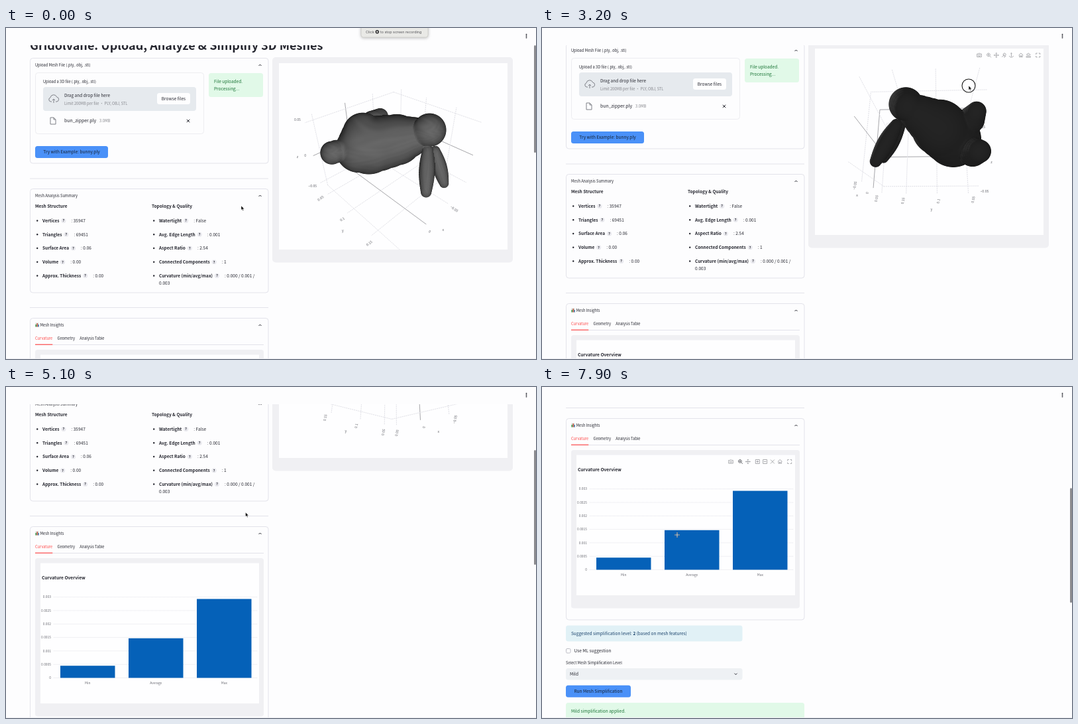
Recreate the animation shown at these times as an HTML page with a canvas. Size 800x499 px, loop 8 s.

```html
<!DOCTYPE html>
<html lang="en">
<head>
<meta charset="utf-8">
<title>Mesh viewer demo</title>
<style>
  html, body { margin: 0; width: 100%; height: 100%; overflow: hidden; background: #fdfdfe; }
  #stage { position: absolute; left: 0; top: 0; width: 800px; height: 499px; overflow: hidden; }
  #view { position: absolute; left: 0; top: 26px; width: 800px; height: 473px; overflow: hidden; }
  #page { position: absolute; left: 0; top: -26px; width: 800px; height: 920px; }
  svg, canvas { position: absolute; left: 0; top: 0; }
  #mesh { left: 412px; top: 53px; }
  text { font-family: "Noto Sans CJK SC", "Noto Sans CJK JP", "Noto Sans CJK", Lato, "Open Sans", sans-serif; white-space: pre; }
  .ui { font-family: Inter, Roboto, sans-serif; }
</style>
</head>
<body>
<div id="stage">
  <div id="view"><div id="page">
    <svg id="doc" width="800" height="920"></svg>
    <canvas id="mesh" width="345" height="281"></canvas>
  </div></div>
  <svg id="over" width="800" height="499"></svg>
</div>
<script>
const $ = id => document.getElementById(id);
const LOOP = 8000, STEP = 100;
const BASE = 6.5, SMALL = 5.7;
const INK = '#25262f', MUTED = '#85868c', RED = '#ff4b4b', BLUE = '#4a91f8';
const PAPER = '#fefeff', BORDER = '#e3e3ea', SAND = '#f0f0f3', FIELD = '#e6eaee', GREEN = '#e1f9e8', LEAF = '#177233';
const doc = $('doc'), over = $('over');

// ---------- drawing helpers ----------
function el(parent, tag, attrs, content) {
  const node = document.createElementNS('http://www.w3.org/2000/svg', tag);
  set(node, attrs);
  if (content != null) node.textContent = content;
  return parent.appendChild(node);
}
function set(node, attrs) {
  for (const k in attrs) node.setAttribute(k, attrs[k]);
}
const group = (p, attrs) => el(p, 'g', attrs);
const rect = (p, x, y, width, height, fill, rx = 0, stroke = 'none') =>
  el(p, 'rect', { x, y, width, height, fill, rx, stroke });
const line = (p, x1, y1, x2, y2, stroke, dash = 'none') =>
  el(p, 'line', { x1, y1, x2, y2, stroke, 'stroke-dasharray': dash });
const path = (p, x, y, d, stroke = INK, width = 1, fill = 'none') =>
  el(p, 'path', { d, stroke, fill, 'stroke-width': width, transform: `translate(${x} ${y})` });
// y is the middle of the letters
const label = (p, x, y, str, size = BASE, fill = INK, weight = 400, anchor = 'start') =>
  el(p, 'text', { x, y: y + size * .36, 'font-size': size, fill, 'font-weight': weight, 'text-anchor': anchor }, str);
const chevron = (p, x, y, dir) => path(p, x, y, `M-2 ${dir}L0 ${-dir} 2 ${dir}`);
const show = (node, on) => node.setAttribute('visibility', on ? 'visible' : 'hidden');

const ICONS = {
  camera: 'M-3.3-2h1.8l1-1h1l1 1h1.8v4.6h-6.6zM0-1.2a1.4 1.4 0 1 0 .01 0',
  zoom: 'M-.6-3a2.4 2.4 0 1 0 .01 0M1.2 1.2L3.3 3.3M-1.8-.6h2.4M-.6-1.8v2.4',
  pan: 'M-3.5 0h7M0-3.5v7M-1-2.5l1-1 1 1M-1 2.5l1 1 1-1M-2.5-1l-1 1 1 1M2.5-1l1 1-1 1',
  orbit: 'M-2.8 2.8L1-1M1-3a2 2 0 1 0 .01 0M0 3a3 3 0 0 0 3-2',
  turn: 'M0-3.5v6M-3 1c0 2.8 6 2.8 6 0M-1-2.5l1-1 1 1',
  home: 'M-3.3 0L0-3 3.3 0M-2.2 0v2.8h1.6v-2h1.2v2h1.6v-2.8',
  reset: 'M-3.3-.5L0-3 3.3-.5M-2.4 0h4.8M-3.3 2h6.6v1h-6.6z',
  full: 'M-3-1v-2h2M1-3h2v2M3 1v2h-2M-1 3h-2v-2',
  plus: 'M-3-3h6v6h-6zM-1.8 0h3.6M0-1.8v3.6',
  minus: 'M-3-3h6v6h-6zM-1.8 0h3.6',
  fit: 'M-3-3L3 3M3-3L-3 3'
};
// '|' widens the gap between two icons
function toolbar(p, x, y, names, active) {
  const g = group(p);
  for (const n of names.split(' ')) {
    if (n === '|') { x += 3.2; continue; }
    path(g, x, y, ICONS[n], n === active ? '#55565c' : '#a2a3a8', .9);
    x += 11.3;
  }
  return g;
}

// ---------- page ----------
label(doc, 36, 26.5, 'Gridolvane: Upload, Analyze & Simplify 3D Meshes', 18, INK, 700);

function expander(y, h, title, x = 44) {
  rect(doc, 36.5, y + .5, 359.5, h, 'none', 4, BORDER);
  label(doc, x, y + 11, title, SMALL);
  chevron(doc, 383.5, y + 11, 1);
}
expander(45, 158.5, 'Upload Mesh File (.ply, .obj, .stl)');
rect(doc, 44.5, 67.5, 254, 92, 'none', 4, '#ededf1');
label(doc, 56, 80.5, 'Upload a 3D file (.ply, .obj, .stl)', SMALL);
rect(doc, 56, 89, 231, 36, FIELD, 4);
path(doc, 72, 107, 'M-3 4h-1.5a3.2 3.2 0 0 1-.5-6.2a5 5 0 0 1 9.6-.8a3.6 3.6 0 0 1 .4 7h-2M0 6v-6M-2 2l2-2 2 2', '#7e8087');
label(doc, 88, 101.5, 'Drag and drop file here');
label(doc, 88, 114, 'Limit 200MB per file • PLY, OBJ, STL', SMALL, MUTED);
rect(doc, 228, 98, 50, 17, PAPER, 3.5);
label(doc, 253, 106.5, 'Browse files', BASE, INK, 400, 'middle');
path(doc, 71, 140, 'M-4-5h5l3 3v7h-8zM1-5v3h3', '#7e8087');
label(doc, 88, 139.5, 'bun_zipper.ply', 6.9);
label(doc, 141, 139.7, '3.0MB', SMALL, MUTED);
path(doc, 275, 140, 'M-2.2-2.2L2.2 2.2M2.2-2.2L-2.2 2.2');
rect(doc, 306, 68, 82, 36, GREEN, 3.5);
label(doc, 314, 80.5, 'File uploaded.', BASE, LEAF);
label(doc, 314, 92, 'Processing...', BASE, LEAF);

function button(x, y, w, str) {
  rect(doc, x, y, w, 18, BLUE, 3.5);
  label(doc, x + w / 2, y + 9, str, BASE, '#16202f', 500, 'middle');
}
button(44, 178, 110, 'Try with Example: bunny.ply');
for (const y of [227, 421.5]) line(doc, 36, y, 396, y, BORDER);

expander(242, 156.5, 'Mesh Analysis Summary');
label(doc, 44, 269, 'Mesh Structure', BASE, INK, 700);
label(doc, 220, 269, 'Topology & Quality', BASE, INK, 700);
function facts(x, rows) {
  Object.entries(rows).forEach(([name, value], i) => {
    const y = 290.5 + 20.75 * i;
    el(doc, 'circle', { cx: x - 7.8, cy: y, r: 1.2, fill: INK });
    const end = x + label(doc, x, y, name, BASE, INK, 700).getComputedTextLength();
    el(doc, 'circle', { cx: end + 6.4, cy: y, r: 3.6, fill: '#e9e9ee' });
    label(doc, end + 6.4, y, '?', 5.2, INK, 700, 'middle');
    label(doc, end + 18, y, ': ' + value);
  });
}
facts(55, { 'Vertices': '35947', 'Triangles': '69451', 'Surface Area': '0.06', 'Volume': '0.00', 'Approx. Thickness': '0.00' });
facts(231, { 'Watertight': 'False', 'Avg. Edge Length': '0.001', 'Aspect Ratio': '2.54', 'Connected Components': '1',
  'Curvature (min/avg/max)': '0.000 / 0.001 /' });
label(doc, 231, 385, '0.003');

expander(437, 303.5, 'Mesh Insights', 51.5);
rect(doc, 44, 444.5, 6, 6, '#dfe6e2');
['#3a9a4a', '#c0503c', '#3a6fa8'].forEach((c, i) => rect(doc, 44.5 + i * 1.9, 447 - i % 2 * 2, 1.5, 3.5 + i % 2 * 2, c));
line(doc, 44, 477.5, 389, 477.5, BORDER);
let tabX = 44;
const tabs = ['Curvature', 'Geometry', 'Analysis Table'].map(s => {
  const x = tabX, node = label(doc, x, 468, s, SMALL), w = node.getComputedTextLength();
  tabX += w + 7.3;
  return { x, node, w };
});
const underline = rect(doc, 44, 476.6, 27, 1.2, RED);
rect(doc, 44, 485, 345, 238.5, SAND, 4);
rect(doc, 52, 492.5, 330, 211.5, PAPER);

function chart(title, tick, names, values) {
  const g = group(doc), zero = 665.5, gap = 20.3;
  label(g, 54, 514.5, title, 6.7, INK, 700);
  for (let i = 0; i <= 6; i++) {
    const y = zero - gap * i;
    line(g, 72, y, 380, y, '#e2e2e8', '1 1');
    label(g, 68, y, String(+(tick * i).toFixed(4)), 4.9, '#6c6d74', 400, 'end');
  }
  names.forEach((name, i) => {
    const x = 82 + 103 * i, h = values[i] / tick * gap;
    rect(g, x, zero - h, 82.5, h, '#0561b8');
    label(g, x + 41.25, zero + 8, name, 4.9, '#6c6d74', 400, 'middle');
  });
  return g;
}
const charts = [
  chart('Curvature Overview', .0005, ['Min', 'Average', 'Max'], [.00045, .00147, .00293]),
  chart('Geometry Overview', .01, ['Surface Area', 'Volume', 'Thickness'], [.06, 0, 0])
];
const chartTools = toolbar(doc, 285, 502.5, 'camera | zoom pan | plus minus fit home | full', 'zoom');

rect(doc, 36, 749.5, 266.5, 24, '#e1f1f6', 3.5);
const advice = label(doc, 44, 761.5, 'Suggested simplification level: ', BASE, '#17406a');
el(advice, 'tspan', { 'font-weight': 700 }, '2');
el(advice, 'tspan', {}, ' (based on mesh features)');
rect(doc, 36.5, 784.5, 6.5, 6.5, PAPER, 1.5, '#bcbcc4');
label(doc, 48.5, 787.7, 'Use ML suggestion');
label(doc, 36, 805.7, 'Select Mesh Simplification Level', SMALL);
rect(doc, 36, 814, 266.5, 17.5, '#eef1f4', 3.5);
label(doc, 42, 822.7, 'Mild');
chevron(doc, 292.5, 822.7, -1);
button(36, 839.7, 98, 'Run Mesh Simplification');
rect(doc, 36, 866, 360, 25, GREEN, 3.5);
label(doc, 44, 878.5, 'Mild simplification applied.', BASE, LEAF);

// ---------- 3D plot ----------
const W = 345, H = 281, LEFT = 412, TOP = 53;
rect(doc, 402, 44, 363, 309.5, SAND, 5);
rect(doc, LEFT, TOP, W, H, PAPER);
rect(el(el(doc, 'defs'), 'clipPath', { id: 'plot' }), LEFT, TOP, W, H);
const plot = group(doc, { 'clip-path': 'url(#plot)' });
const plotTools = toolbar(doc, 660, 63, 'camera | zoom pan orbit turn | home reset | full');

// Data units of 0.1 are scaled so that the box has a volume of one
const UNIT = .7, FOCAL = H / 2 / Math.tan(Math.PI / 8), DIST = Math.sqrt(3) * 1.25;
const AXES = [
  { name: 'x', mid: -.17, half: .546, ticks: [.5, 0, -.5] },
  { name: 'y', mid: 1.1, half: .54, ticks: [.5, 1, 1.5] },
  { name: 'z', mid: -.015, half: .42, ticks: [.5, 0, -.5] }
];
for (const a of AXES) {
  a.at = a.ticks.map(v => (v - a.mid) * UNIT);
  a.labels = [...a.ticks.map(v => String(v / 10).replace('-', '−')), a.name];
}
const gridLines = Array.from({ length: 18 }, () => line(plot, 0, 0, 0, 0, '#e0e0e6'));
for (const a of AXES) a.nodes = a.labels.map(s => label(plot, 0, 0, s, 5.2, '#66676d', 400, 'middle'));

const dot = (a, b) => a[0] * b[0] + a[1] * b[1] + a[2] * b[2];
const mix = (a, b, k) => a.map((v, i) => v + (b[i] - v) * k);

function camera(azimuth, elevation) {
  const a = azimuth * Math.PI / 180, e = elevation * Math.PI / 180;
  const ca = Math.cos(a), sa = Math.sin(a), ce = Math.cos(e), se = Math.sin(e);
  const eye = [ca * ce, sa * ce, se], right = [-sa, ca, 0], up = [-se * ca, -se * sa, ce];
  const project = p => {
    const near = dot(p, eye), scale = FOCAL / (DIST - near);
    return { x: W / 2 + dot(p, right) * scale, y: H / 2 - dot(p, up) * scale, near, scale };
  };
  return { eye, right, up, project };
}

function drawAxes({ eye, project }) {
  const side = eye.map(v => v < 0 ? -1 : 1);
  const screen = p => { const q = project(p); return [LEFT + q.x, TOP + q.y]; };
  let n = 0;
  // grid on the three far walls
  for (let wall = 0; wall < 3; wall++) {
    for (const [along, across] of [[(wall + 1) % 3, (wall + 2) % 3], [(wall + 2) % 3, (wall + 1) % 3]]) {
      AXES[across].at.forEach((v, i) => {
        const p = [0, 0, 0];
        p[wall] = -side[wall] * AXES[wall].half;
        p[across] = v;
        p[along] = -AXES[along].half;
        const [x1, y1] = screen(p);
        p[along] *= -1;
        const [x2, y2] = screen(p);
        const zero = AXES[across].ticks[i] === 0;
        set(gridLines[n++], { x1, y1, x2, y2, stroke: zero ? '#a6a6aa' : '#e0e0e6', 'stroke-dasharray': zero ? 'none' : '2 1' });
      });
    }
  }
  // tick labels sit just outside the outline of the box
  AXES.forEach((axis, i) => {
    const edge = i === 2 ? [1, -side[0] * side[1], 0] : [side[0] * side[2], side[1] * side[2], -1];
    const base = edge.map((s, j) => s * AXES[j].half), next = [...base];
    const other = i === 2 ? 0 : 1 - i;
    base[i] = next[i] = 0;
    next[other] *= .8;
    const a = screen(base), b = screen(next);
    const slope = Math.atan((a[1] - b[1]) / (a[0] - b[0])) * 180 / Math.PI;
    const turn = i === 2 ? 0 : eye[2] < 0 ? -78 : slope;
    axis.nodes.forEach((node, j) => {
      const p = [...base], title = j === 3;
      p[i] = title ? 0 : axis.at[j];
      const [x, y] = screen(p), dx = x - LEFT - W / 2, dy = y - TOP - H / 2;
      const k = 1 + (title ? 24 : 12) / Math.hypot(dx, dy);
      set(node, { transform: `translate(${LEFT + W / 2 + dx * k} ${TOP + H / 2 + dy * k}) rotate(${title ? 0 : turn})` });
    });
  });
}

// The rabbit is a union of limbs, each a chain of spheres
const limb = (from, to, r0, r1, bulge = 0) => {
  const n = Math.ceil(Math.hypot(...from.map((v, i) => to[i] - v)) / (.4 * Math.min(r0, r1)));
  return Array.from({ length: n + 1 }, (_, i) => {
    const k = i / n;
    return { p: mix(from, to, k), r: r0 + (r1 - r0) * k + bulge * Math.sin(Math.PI * k) };
  });
};
const HIP = [.1, -.24, .06], CHEST = [-.15, -.1, .08];
const spheres = [
  limb(HIP, CHEST, .285, .26),
  limb(CHEST, [-.27, .08, .16], .25, .17),
  limb([-.27, .2, .26], [-.37, .17, .18], .155, .12),
  limb([.2, -.27, .05], [.1, -.32, .17], .23, .2),
  limb([.4, -.35, .08], [.44, -.36, .08], .11, .11),
  limb([-.1, -.4, .18], [-.23, -.43, .2], .13, .09),
  limb([-.05, -.4, -.12], [-.22, -.43, -.17], .14, .1),
  limb([-.2, .25, .1], [.03, .44, -.15], .05, .05, .025),
  limb([-.3, .27, .05], [-.3, .42, -.27], .05, .05, .025)
].flat();

const LIGHT = [.55, .68, .49];
const ctx = $('mesh').getContext('2d');
const image = ctx.createImageData(W, H);
const field = new Float32Array(W * H * 4);

function drawMesh({ eye, right, up, project }) {
  field.fill(0);
  for (const { p, r } of spheres) {
    const c = project(p), R = r * c.scale;
    for (let y = Math.max(0, Math.floor(c.y - R)); y < Math.min(H, c.y + R); y++) {
      for (let x = Math.max(0, Math.floor(c.x - R)); x < Math.min(W, c.x + R); x++) {
        const u = (x + .5 - c.x) / R, v = (y + .5 - c.y) / R, q = 1 - u * u - v * v;
        if (q <= 0) continue;
        const z = Math.sqrt(q), w = Math.exp((c.near + r * z) * 40), o = (y * W + x) * 4;
        field[o] += w * u;
        field[o + 1] += w * v;
        field[o + 2] += w * z;
        field[o + 3] = Math.max(field[o + 3], Math.min(1, q * R / 1.6));
      }
    }
  }
  const lx = dot(LIGHT, right), ly = -dot(LIGHT, up), lz = dot(LIGHT, eye);
  for (let o = 0; o < field.length; o += 4) {
    const [nx, ny, nz, alpha] = field.subarray(o, o + 4);
    image.data[o + 3] = alpha * 255;
    if (!alpha) continue;
    const len = Math.hypot(nx, ny, nz);
    // ripples follow the surface direction, so they turn with the body
    const a = (nx * right[0] - ny * up[0] + nz * eye[0]) / len, b = (-ny * up[2] + nz * eye[2]) / len;
    const ripple = .04 * Math.sin(16 * a + 3 * Math.sin(9 * b)) * Math.cos(14 * b);
    const lit = Math.max(0, (nx * lx + ny * ly + nz * lz) / len + ripple);
    image.data[o] = image.data[o + 1] = image.data[o + 2] = 24 + 66 * lit + 12 * nz / len;
  }
  ctx.putImageData(image, 0, 0);
}

// ---------- overlay ----------
line(over, 0, 498.5, 800, 498.5, '#f1f1f5');
for (const y of [9.8, 12.2, 14.6]) el(over, 'circle', { cx: 785.5, cy: y, r: .95, fill: INK });
const scrollbar = rect(over, 797, 26, 3, 162, '#8c8c90', 1.5);
const toast = group(over);
rect(toast, 536, -4, 101, 18, '#e9e9e6', 3.5, '#d0d0cc').style.filter = 'drop-shadow(0 1px 2px #8888)';
label(toast, 543, 5.8, 'Click', 5.4, '#55555a').setAttribute('class', 'ui');
label(toast, 565, 5.8, 'to stop screen recording', 5.4, '#55555a').setAttribute('class', 'ui');
el(toast, 'circle', { cx: 560.3, cy: 5.8, r: 2.8, fill: '#38383a' });
rect(toast, 559.3, 4.8, 2, 2, '#e9e9e6');

const pointer = group(over);
const ring = el(pointer, 'circle', { r: 10, fill: 'none', stroke: '#161616', 'stroke-width': 1.1 });
const shapes = {
  arrow: path(pointer, 0, 0, 'M0 0V6.4L1.5 5.1 2.5 7.4 3.6 6.9 2.6 4.8H4.7Z', '#fff', .5, '#000'),
  hand: path(pointer, 0, 0, 'M-.6 .2Q.2-.8.8.2V3L3.6 3.6Q4.6 4 4.2 5.6L3.4 8H-.4L-2.6 5Q-2.6 3.8-1.6 4.2L-.6 5Z', '#222', .8, '#fff'),
  cross: path(pointer, 0, 0, 'M-4-.6H-.6V-4H.6V-.6H4V.6H.6V4H-.6V.6H-4Z', '#4c5a66', .5, '#fff')
};

// ---------- timeline: [time, ...values] ----------
const SCROLL = [[200, 0], [600, 22], [3700, 22], [4300, 63.5], [4500, 95], [5100, 227], [5700, 312.5], [7300, 312.5], [7700, 390]];
const POINTER = [[300, 355, 268], [1000, 530, 160], [1400, 523.5, 174], [3200, 644, 87], [3900, 371, 182], [4300, 370.5, 182],
  [5100, 361.5, 189], [5600, 361, 189], [5900, 98, 160], [6150, 98, 160], [6400, 140, 180], [6800, 58, 159], [7000, 57, 158], [7300, 204, 223]];
const CAMERA = [[1000, 45, 35.3], [1400, 84, 38], [3200, 182, -20], [3600, 134, -27]];
const within = (t, a, b) => t >= a && t < b;
const ramp = (t, a, b) => Math.min(1, Math.max(0, (t - a) / (b - a)));

function track(keys, t) {
  let i = 0;
  while (i < keys.length - 2 && t >= keys[i + 1][0]) i++;
  const [a, b] = [keys[i], keys[i + 1]];
  return mix(a, b, ramp(t, a[0], b[0])).slice(1);
}

let lastView = '';
function frame(t) {
  const [scroll] = track(SCROLL, t), [x, y] = track(POINTER, t), view = track(CAMERA, t);
  $('page').style.transform = `translateY(${-scroll}px)`;

  const thumb = 15 + .352 * scroll, top = Math.max(26, thumb);
  const opacity = 1 - ramp(t, 900, 1200) + ramp(t, 3600, 3700) - ramp(t, 5800, 6300) + ramp(t, 7200, 7300);
  set(scrollbar, { y: top, height: thumb + 173 - top, opacity });
  set(toast, { transform: `translate(0 ${-20 * ramp(t, 1900, 2200)})` });

  if (lastView !== String(view)) {
    const cam = camera(...view);
    drawAxes(cam);
    drawMesh(cam);
    lastView = String(view);
  }
  show(plotTools, within(t, 800, 3700));
  show(chartTools, t >= 7200);

  const active = within(t, 6100, 7000) ? 1 : 0;
  const hover = within(t, 5900, 6200) ? 1 : within(t, 6800, 7100) ? 0 : -1;
  tabs.forEach((tab, i) => set(tab.node, { fill: i === active || i === hover ? RED : INK }));
  set(underline, { x: tabs[active].x, width: tabs[active].w });
  charts.forEach((c, i) => show(c, i === active));

  set(pointer, { transform: `translate(${x} ${y})` });
  const kind = t >= 7200 ? 'cross' : hover >= 0 ? 'hand' : 'arrow';
  for (const k in shapes) show(shapes[k], k === kind);
  const click = within(t, 5950, 6150) || within(t, 6900, 7050);
  show(ring, click || within(t, 1100, 3500));
  set(ring, { r: click ? 14.3 : 10 });
}

const start = performance.now();
function tick() {
  const t = (performance.now() - start) % LOOP;
  frame(Math.floor(t / STEP) * STEP);
  requestAnimationFrame(tick);
}
tick();
</script>
</body>
</html>
```
